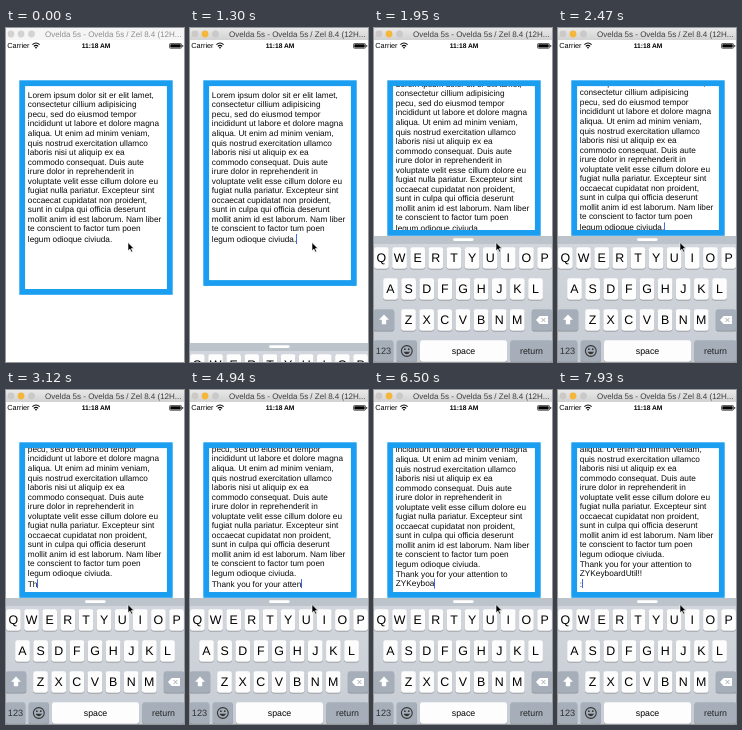
Animation, 178 px wide and 334 px high, one loop 8 s. Source, as an HTML page:

```html
<!DOCTYPE html>
<html lang="en">
<head>
<meta charset="utf-8">
<title>Text view and keyboard</title>
<style>
html, body { margin: 0; width: 100%; height: 100%; overflow: hidden; background: #fff; }
body { position: relative; font-family: "Liberation Sans", Arial, sans-serif; text-rendering: geometricPrecision; }
#stage { position: absolute; left: 0; top: 0; width: 178px; height: 334px; overflow: hidden; background: #fff; }
#box { position: absolute; left: 19px; top: 58px; width: 142px; overflow: hidden; }
#text { position: absolute; left: 2.8px; top: 4.8px; margin: 0; white-space: pre; color: #0a0a0a;
  font: 8.25px/9.55px "Liberation Sans", Arial, sans-serif; }
#caret { display: inline-block; width: 1px; height: 9.5px; margin: 0 -1px 0 0; vertical-align: -2px; background: #4169e6; }
svg { position: absolute; left: 0; top: 0; font-family: "Liberation Sans", Arial, sans-serif; }
</style>
</head>
<body>
<div id="stage">
  <div id="box"><pre id="text"><span id="words"></span><span id="caret"></span></pre></div>

  <svg width="178" height="334" viewBox="0 0 178 334">
    <defs>
      <linearGradient id="bar" x1="0" y1="0" x2="0" y2="1">
        <stop offset="0" stop-color="#e9e8e9"/><stop offset="1" stop-color="#d3d2d3"/>
      </linearGradient>
      <linearGradient id="board" x1="0" y1="0" x2="0" y2="1">
        <stop offset="0" stop-color="#d3d7dd"/><stop offset="1" stop-color="#c6ccd4"/>
      </linearGradient>
    </defs>
    <rect id="titleBar" width="178" height="12"/>
    <circle class="light" cx="5" cy="6" r="3.4"/>
    <circle class="light" cx="15" cy="6" r="3.4"/>
    <circle class="light" cx="25.5" cy="6" r="3.4"/>
    <text id="title" x="39" y="9" font-size="8">Ovelda 5s - Ovelda 5s / Zel 8.4 (12H...</text>

    <text x="1.2" y="20.3" font-size="7.3">Carrier</text>
    <g fill="none" stroke="#000" stroke-width="1.1">
      <path d="M26.4 16.6Q30 13.5 33.6 16.6M27.8 18.3Q30 16.4 32.2 18.3"/>
    </g>
    <path d="M28.8 19.5Q30 18.5 31.2 19.5L30 20.8Z"/>
    <text x="90" y="20.3" font-size="6.7" font-weight="bold" text-anchor="middle">11:18 AM</text>
    <g transform="translate(2)">
      <rect x="161.5" y="15.5" width="12" height="4.8" rx="1" fill="none" stroke="#000" stroke-width=".6"/>
      <rect x="162.3" y="16.3" width="10.4" height="3.2" rx=".4"/>
      <rect x="174.2" y="17" width="1" height="1.8" rx=".4"/>
    </g>

    <rect id="frame" x="16.2" y="55.2" width="147.6" fill="none" stroke="#1b9df0" stroke-width="5.8"/>
    <g id="keyboard"></g>

    <path d="M122 214.5v8.3l1.9-1.8 1.3 3 1.4-.6-1.3-2.9h2.6z" fill="#000" stroke="#fff" stroke-width=".6"/>
  </svg>
</div>

<script>
const $ = id => document.getElementById(id);
const LOOP = 8000, STEP = 130;

const BODY = `Lorem ipsum dolor sit er elit lamet,
consectetur cillium adipisicing
pecu, sed do eiusmod tempor
incididunt ut labore et dolore magna
aliqua. Ut enim ad minim veniam,
quis nostrud exercitation ullamco
laboris nisi ut aliquip ex ea
commodo consequat. Duis aute
irure dolor in reprehenderit in
voluptate velit esse cillum dolore eu
fugiat nulla pariatur. Excepteur sint
occaecat cupidatat non proident,
sunt in culpa qui officia deserunt
mollit anim id est laborum. Nam liber
te conscient to factor tum poen
legum odioque civiuda.`;
const TYPED = "\nThank you for your attention to ZYKeyboardUtil!!\n:";
const WRAP_AT = 33, WRAP_FROM = 37;

// time, number of characters typed
const TYPING = [[2600, 0], [2730, 1], [2860, 1.2], [3120, 3.2], [4940, 25.2],
  [5700, 33.2], [6500, 41.3], [7410, 49.5], [7540, 50.1], [7800, 51.1]];
// start time, scroll position
const SCROLLS = [[1800, 11.6], [2700, 26.9], [6050, 36.4], [7500, 46]];
const RISE = { start: 1270, length: 640, from: 334, to: 208 };

function key(x, y, w, label, size = 12.4, fill = "#fdfdfe", ink = "#000") {
  const left = x - w / 2, top = y - 10.8;
  return `<rect x="${left}" y="${top + 0.8}" width="${w}" height="21.6" rx="2.4" fill="#8a8d92"/>` +
    `<rect x="${left}" y="${top}" width="${w}" height="21.6" rx="2.4" fill="${fill}"/>` +
    `<text x="${x}" y="${y + size * 0.36}" font-size="${size}" fill="${ink}" text-anchor="middle">${label}</text>`;
}

function buildKeyboard() {
  const grey = "#a5aeb9";
  let out = `<rect y="208" width="178" height="140" fill="url(#board)"/>
    <rect y="208" width="178" height="8" fill="#bcc3cb"/>
    <rect x="79" y="210.2" width="20.6" height="2.8" rx="1.4" fill="#fff"/>`;
  [["QWERTYUIOP", 7.4], ["ASDFGHJKL", 16.5], ["ZXCVBNM", 34.5]].forEach(([row, x], r) => {
    [...row].forEach((c, i) => out += key(x + 18.13 * i, 230 + 31 * r, 14.7, c));
  });
  out += key(10, 292, 20.4, "", 8, grey) + key(168, 292, 20.4, "", 8, grey) +
    key(9.5, 323, 19.5, "123", 9.2, grey, "#333") + key(32.8, 323, 20, "", 8, grey) +
    key(89.5, 323, 87, "space", 8.8) + key(157.5, 323, 42, "return", 8.8, grey, "#222");
  out += `<path d="M10 286.5l5 5.2h-2.8v4.6H7.8v-4.6H5z" fill="#fff"/>
    <path d="M162 292l3.6-4h8.4v8h-8.4z" fill="#fff"/>
    <path d="M167.6 290l3.8 4m0-4l-3.8 4" stroke="${grey}" stroke-width="1"/>
    <circle cx="32.8" cy="323" r="5.4" fill="none" stroke="#333" stroke-width="1.1"/>
    <path d="M29.5 323.8Q32.8 328.8 36.1 323.8Z" fill="#333"/>
    <circle cx="30.9" cy="321.2" r=".9" fill="#333"/><circle cx="34.7" cy="321.2" r=".9" fill="#333"/>`;
  $("keyboard").innerHTML = out;
}

const clamp = p => Math.max(0, Math.min(1, p));
const easeOut = p => 1 - (1 - clamp(p)) ** 3.4;

function typedCount(t) {
  let n = 0;
  TYPING.forEach(([t0, a], i) => {
    if (t < t0) return;
    const next = TYPING[i + 1];
    n = next ? a + (next[1] - a) * clamp((t - t0) / (next[0] - t0)) : a;
  });
  return Math.floor(n);
}

function scrollAt(t) {
  return SCROLLS.reduce((y, [start, to]) => y + (to - y) * easeOut((t - start) / 280), 0);
}

function drawTitle(active) {
  $("titleBar").setAttribute("fill", active ? "url(#bar)" : "#f5f5f5");
  $("title").setAttribute("fill", active ? "#3f3f3f" : "#8f8f8f");
  const colors = active ? ["#cdc9c8", "#f5b63c", "#c9c9c9"] : ["#d3d3d3", "#d3d3d3", "#d3d3d3"];
  document.querySelectorAll(".light").forEach((c, i) => c.setAttribute("fill", colors[i]));
}

function draw(t) {
  const rise = easeOut((t - RISE.start) / RISE.length);
  const n = typedCount(t);
  let typed = TYPED.slice(0, n);
  if (n >= WRAP_FROM) typed = typed.slice(0, WRAP_AT) + "\n" + typed.slice(WRAP_AT);

  drawTitle(t >= 1170);
  $("keyboard").setAttribute("transform", `translate(0 ${(RISE.from - RISE.to) * (1 - rise)})`);
  const height = 203 - 59 * rise;
  $("box").style.height = height + "px";
  $("frame").setAttribute("height", height + 5.7);
  $("words").textContent = BODY + typed;
  $("text").style.transform = `translateY(${-scrollAt(t)}px)`;

  const blinkOn = (t - 1300) % 1000 < 550 || (t > 2300 && t < 2600);
  $("caret").style.visibility = t >= 1300 && (n > 0 || blinkOn) ? "visible" : "hidden";
}

buildKeyboard();
const begin = performance.now();
function tick() {
  const t = (performance.now() - begin) % LOOP;
  draw(Math.floor(t / STEP) * STEP);
  requestAnimationFrame(tick);
}
tick();
</script>
</body>
</html>
```
